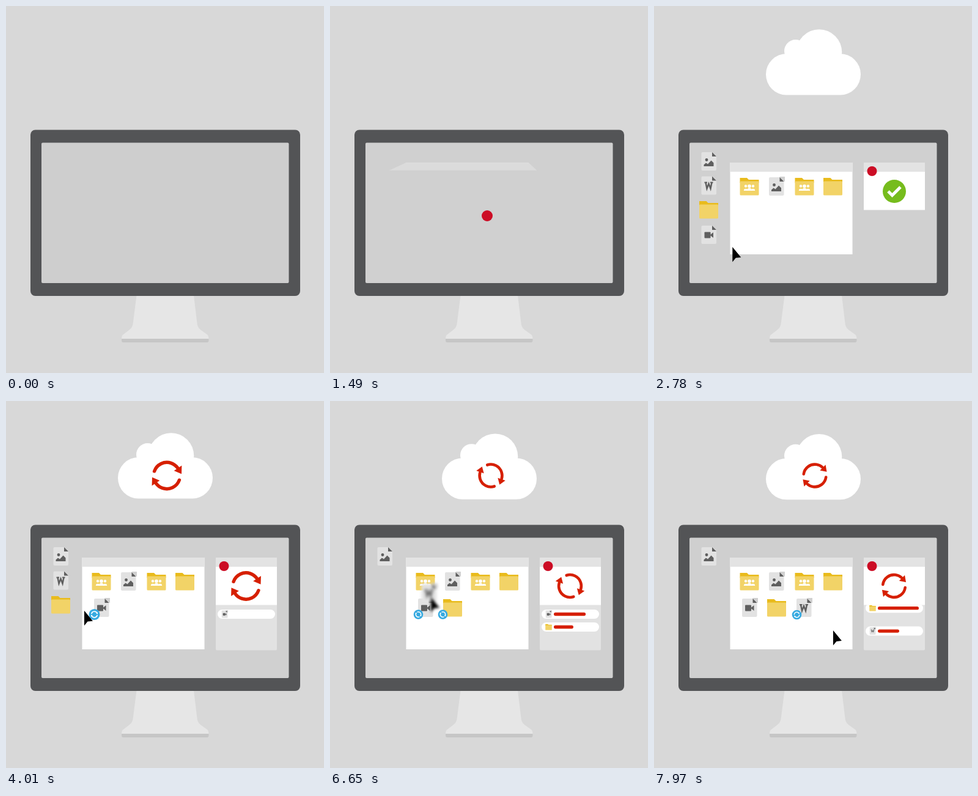
An HTML page with a canvas that plays this animation: 520x600 px, repeating every 8000 ms.

```html
<!DOCTYPE html>
<html>
<head>
<meta charset="utf-8">
<style>
html, body { margin: 0; width: 100%; height: 100%; overflow: hidden; background: #d8d8d8; }
canvas { display: block; }
</style>
</head>
<body>
<canvas id="stage" width="520" height="600"></canvas>
<script>
const ctx = document.getElementById('stage').getContext('2d');
const LOOP = 8000, DRAG = 500;
const RED = '#d61f00', GREY = '#e2e2e2', DARK = '#5f5f5f';

// Timing helpers
const unit = (t, start, dur) => Math.min(1, Math.max(0, (t - start) / dur));
const mix = (a, b, p) => a + (b - a) * p;
const inOut = u => u < .5 ? 2 * u * u : 1 - 2 * (1 - u) ** 2;
const back = (u, s = 2.6) => u <= 0 ? 0 : 1 + (s + 1) * (u - 1) ** 3 + s * (u - 1) ** 2;

// Drawing helpers
function poly(color, ...pts) {
  ctx.fillStyle = color;
  ctx.beginPath();
  for (let i = 0; i < pts.length; i += 2) ctx.lineTo(pts[i], pts[i + 1]);
  ctx.fill();
}
function box(color, x, y, w, h, r = 0) {
  ctx.fillStyle = color;
  ctx.beginPath();
  ctx.roundRect(x, y, w, h, r);
  ctx.fill();
}
function disc(color, x, y, r) {
  ctx.fillStyle = color;
  ctx.beginPath();
  ctx.arc(x, y, r, 0, 7);
  ctx.fill();
}
function line(color, width, ...pts) {
  ctx.strokeStyle = color;
  ctx.lineWidth = width;
  ctx.beginPath();
  for (let i = 0; i < pts.length; i += 2) ctx.lineTo(pts[i], pts[i + 1]);
  ctx.stroke();
}
function at(x, y, scale, draw) {
  if (scale <= 0) return;
  ctx.save();
  ctx.translate(x, y);
  ctx.scale(scale, scale);
  draw();
  ctx.restore();
}

function sheet() {
  box(GREY, -12, -15, 24.5, 30, 2);
  poly('#d0d0d0', 5, -16, 14, -16, 14, -7.5);
  poly(DARK, 5.5, -15, 12.5, -8, 5.5, -8);
}
const icons = {
  image() {
    sheet();
    disc(DARK, -3.5, -2.5, 2.4);
    poly(DARK, -8, 8, -8, 5.5, -4.5, 2.5, -1.5, 4.5, 4, -1.5, 8, 2.5, 8, 8);
  },
  word() {
    sheet();
    line(DARK, 2.5, -5, -5, -3, 5, 0, -3, 3, 5, 5, -5);
    line(DARK, 2, -7, -5, -2.5, -5);
    line(DARK, 2, 2.5, -5, 7, -5);
  },
  video() {
    sheet();
    box(DARK, -7, -4.5, 10, 10, 1);
    poly(DARK, 2, .5, 7.5, -4, 7.5, 5);
  },
  folder() {
    poly('#e9bb1c', -15.5, -14, -4, -14, -1, -11, 15.5, -11, 15.5, -6, -15.5, -6);
    box('#f2d367', -15.5, -8.5, 31, 23, 1.5);
  },
  shared() {
    icons.folder();
    for (const [x, y, k] of [[-6, 0, .8], [6, 0, .8], [0, 0, 1.05]]) {
      disc('#fff', x, y - .5, 2.7 * k);
      ctx.beginPath();
      ctx.ellipse(x, 7, 4 * k, 4.2 * k, 0, Math.PI, 0);
      ctx.fill();
    }
  }
};

function syncArrows(x, y, scale, angle, color = RED, width = 4.6) {
  at(x, y, scale, () => {
    ctx.rotate(angle);
    ctx.lineCap = 'round';
    for (let i = 0; i < 2; i++) {
      ctx.strokeStyle = color;
      ctx.lineWidth = width;
      ctx.beginPath();
      ctx.arc(0, 0, 18.4, -2.42, -.25);
      ctx.stroke();
      ctx.save();
      ctx.rotate(-.21);
      poly(color, 12, 0, 25, 0, 18.2, 9.5);
      ctx.restore();
      ctx.rotate(Math.PI);
    }
  });
}

const desktop = [['image', 89.5, 254], ['word', 89.5, 293.5], ['folder', 89.5, 333], ['video', 89.5, 374]];
const stored = [['shared', 156, 295], ['image', 200, 295], ['shared', 246, 295], ['folder', 292.5, 295]];

// Dragged files: target place, sync badge and upload row
const uploads = {
  video: { grab: 3195, x: 156, y: 338, badge: [-11.5, 11], added: 3780, start: 4030, dur: 3370, done: 7300,
    slot: 348.5, steps: [7400] },
  folder: { grab: 4845, x: 200.5, y: 338, badge: [-16, 11], added: 5560, start: 5750, dur: 1890, done: 7650,
    slot: 369.5, steps: [7400, 7850] },
  word: { grab: 6410, x: 245, y: 338, badge: [-11.5, 11.5], added: 7020, start: 7100, dur: 1667, done: 8900,
    slot: 390.5, steps: [7820] }
};

// Pointer moves: start, duration, destination
const moves = [[2240, 810, 93, 381], [3195, DRAG, 159, 345], [3720, 600, 93, 340], [4845, DRAG, 203.5, 345],
  [5600, 600, 93, 300], [6410, DRAG, 248, 345], [7600, 541, 304, 382.5]];
function pointer(t) {
  let x = 253, y = 440;
  for (const [start, dur, tx, ty] of moves) {
    const p = inOut(unit(t, start, dur));
    x = mix(x, tx, p);
    y = mix(y, ty, p);
  }
  return [x, y];
}

function cloud(t) {
  const rise = 1 - (1 - unit(t, 2230, 450)) ** 2;
  const y = mix(210, 32, rise) + 20 * inOut(unit(t, 2680, 260)) + Math.max(0, t - 4000) * .00045;
  if (rise <= 0) return;
  box('#fff', 183, y + 40, 155, 67.5, 33.7);
  disc('#fff', 270, y + 37.5, 37.3);
  disc('#fff', 231.5, y + 35.5, 18.5);
}

function monitor(t) {
  ctx.fillStyle = '#e6e6e6';
  ctx.beginPath();
  ctx.moveTo(213.5, 473);
  ctx.lineTo(207.5, 520);
  ctx.quadraticCurveTo(206.5, 526, 201, 530);
  ctx.lineTo(191, 537.5);
  ctx.quadraticCurveTo(189, 539, 189, 545);
  ctx.lineTo(331.5, 545);
  ctx.quadraticCurveTo(331.5, 539, 329.5, 537.5);
  ctx.lineTo(319, 530);
  ctx.quadraticCurveTo(313.5, 526, 312.7, 520);
  ctx.lineTo(307, 473);
  ctx.fill();
  box('#c6c6c6', 189, 544, 142.5, 6, [0, 0, 3, 3]);
  box('#535456', 40, 202.5, 441, 271.5, 8);
  const shade = Math.round(206 + 2 * unit(t, 300, 600) - unit(t, 6900, 400));
  box(`rgb(${shade},${shade},${shade})`, 58, 223.5, 404.5, 229.5, 2);
}

// A window swinging open from its top edge
function flap(t, start, x, y, w, h) {
  const u = unit(t, start, 420);
  if (u <= 0) return;
  const full = h * back(u, 2.2), wide = 1 - u;
  const left = k => x - 28 * wide * k, right = k => x + w + 14 * wide * k;
  const head = 15 / h;
  ctx.globalAlpha = .22 + .78 * u;
  poly('#fff', left(0), y, right(0), y, right(1), y + full, left(1), y + full);
  poly('#e3e3e3', left(0), y, right(0), y, right(head), y + full * head, left(head), y + full * head);
  ctx.globalAlpha = 1;
}

function uploadRow(name, file, t) {
  const shown = inOut(unit(t, file.added, 220));
  const y = file.slot - 21 * file.steps.reduce((sum, s) => sum + inOut(unit(t, s, 250)), 0);
  at(393, y, shown, () => {
    box('#fff', -47, -7.5, 94, 15, 7.5);
    at(-35.5, 0, name === 'folder' ? .34 : .4, icons[name]);
    const done = 67 * unit(t, file.start, file.dur);
    if (done > 0) box(RED, -27, -2.7, done, 5.4, Math.min(2.7, done / 2));
  });
}

function panel(t, spin) {
  const grow = 74 * back(unit(t, 3650, 360), 2.8);
  if (grow > 0) box(GREY, 343, 331, 100, grow + 2.5, [0, 0, 2, 2]);
  ctx.save();
  ctx.beginPath();
  ctx.rect(343, 333.5, 100, Math.max(0, grow));
  ctx.clip();
  for (const name in uploads) uploadRow(name, uploads[name], t);
  ctx.restore();
  flap(t, 1640, 343, 256, 100, 77.5);

  at(393, 303, back(unit(t, 2250, 450)) * (1 - unit(t, 3650, 110)), () => {
    disc('#76bc1d', 0, 0, 19);
    ctx.lineCap = 'butt';
    line('#fff', 5, -10, 0, -3.5, 6.5, 10, -7);
  });
  syncArrows(392.5, 302.5, back(unit(t, 3760, 480), 2.4), spin);

  const fly = inOut(unit(t, 1500, 300));
  disc('#cc0d25', mix(257, 356.5, fly), mix(343, 270, fly), mix(9, 8, fly) * back(unit(t, 1150, 320)));
}

function files(t, spin, blur) {
  stored.forEach(([name, x, y], i) => at(x, y, back(unit(t, 1850 + i * 100, 450)), icons[name]));
  let held = null;
  desktop.forEach(([name, x, y], i) => {
    const file = i && uploads[name];
    const p = file ? inOut(unit(t, file.grab, DRAG)) : 0;
    const draw = () => at(file ? mix(x, file.x, p) : x, file ? mix(y, file.y, p) : y,
      back(unit(t, 1720 + i * 120, 450)), icons[name]);
    if (p > 0 && p < 1) held = draw; else draw();
  });
  for (const file of Object.values(uploads)) {
    const scale = back(unit(t, file.added, 350)) * (1 - unit(t, file.done, 120));
    at(file.x + file.badge[0], file.y + file.badge[1], scale, () => {
      disc('#37aae0', 0, 0, 7.8);
      syncArrows(0, 0, .23, spin, '#fff', 6.5);
    });
  }
  if (held) {
    ctx.filter = blur;
    held();
    ctx.filter = 'none';
  }
}

function render(t) {
  ctx.lineCap = 'butt';
  box('#d8d8d8', 0, 0, 520, 600);
  const spin = (-22 + (t - 4010) * .088) * Math.PI / 180;
  const [x, y] = pointer(t), [px, py] = pointer(t - 10);
  const soft = Math.max(0, Math.hypot(x - px, y - py) / 10 - .2) * 5;
  const blur = soft > .05 ? `blur(${soft}px)` : 'none';

  cloud(t);
  syncArrows(263, 122, back(unit(t, 3760, 480), 2.4), spin);
  monitor(t);
  ctx.save();
  ctx.beginPath();
  ctx.rect(58, 223.5, 404.5, 229.5);
  ctx.clip();
  flap(t, 1484, 124.5, 256, 200, 150);
  panel(t, spin);
  files(t, spin, blur);
  if (t > 2240) {
    ctx.globalAlpha = unit(t, 2240, 150);
    ctx.filter = blur;
    at(x, y, 1, () => poly('#000', 0, 0, 0, 24.5, 5.5, 17.8, 14, 17));
  }
  ctx.restore();
}

function frame() {
  render(performance.now() % LOOP);
  requestAnimationFrame(frame);
}
frame();
</script>
</body>
</html>
```
